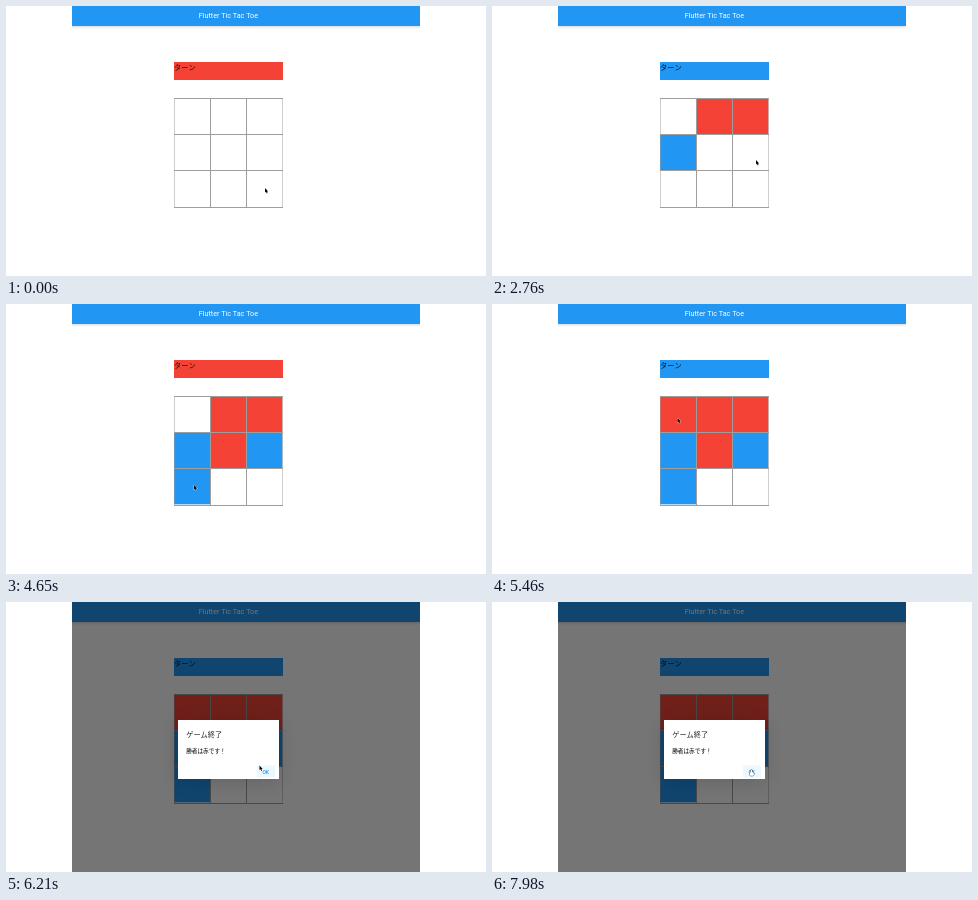
An HTML page with a canvas that plays this animation: 480x270 px, repeating every 8000 ms.

```html
<!DOCTYPE html>
<html lang="ja">
<head>
<meta charset="utf-8">
<title>Flutter Tic Tac Toe</title>
<style>
  html, body { margin: 0; width: 100%; height: 100%; overflow: hidden; background: #fff; }
  canvas { display: block; }
</style>
</head>
<body>
<canvas id="stage" width="480" height="270"></canvas>
<script>
const ctx = document.getElementById('stage').getContext('2d');
const LOOP = 8000;
const RED = '#f44336', BLUE = '#2196f3', INK = 'rgba(0,0,0,.87)';
const FONT = 'Roboto, "Noto Sans CJK JP", "Noto Sans CJK", sans-serif';
const BOARD = { x: 168, y: 92.3, size: 109, cell: 109 / 3 };
const MS_PER_PIXEL = 6;

// Where the pointer comes to rest, and when it arrives there
const stops = [
  { at: 0, x: 259, y: 182 },
  { at: 930, x: 223, y: 111 },
  { at: 1500, x: 182, y: 143.5 },
  { at: 2280, x: 258, y: 112 },
  { at: 2760, x: 264, y: 154 },
  { at: 3130, x: 225, y: 155 },
  { at: 3840, x: 190, y: 121 },
  { at: 4440, x: 188, y: 181 },
  { at: 5220, x: 185.5, y: 114 },
  { at: 6210, x: 253.5, y: 163.5 },
  { at: 6620, x: 357, y: 171 },
  { at: 7020, x: 291, y: 166 },
  { at: 7740, x: 259.5, y: 168 },
];
const clicks = [1080, 1710, 2370, 2940, 3480, 4590, 5460];
const dialogStart = clicks.at(-1) + 30;

const clamp = v => Math.max(0, Math.min(1, v));
const smooth = v => v * v * (3 - 2 * v);

function pointerAt(t) {
  const next = stops.findIndex(stop => stop.at > t);
  if (next < 0) return stops.at(-1);
  const from = stops[next - 1], to = stops[next];
  const travel = MS_PER_PIXEL * Math.hypot(to.x - from.x, to.y - from.y);
  const depart = Math.max(from.at, to.at - travel);
  const k = smooth(clamp((t - depart) / (to.at - depart)));
  return { x: from.x + (to.x - from.x) * k, y: from.y + (to.y - from.y) * k };
}

// Each click claims the cell under the pointer; red starts
const gridLine = (origin, i) => Math.floor(origin + i * BOARD.cell);
const moves = clicks.map((time, i) => {
  const { x, y } = pointerAt(time);
  return {
    time,
    col: Math.floor((x - BOARD.x) / BOARD.cell),
    row: Math.floor((y - BOARD.y) / BOARD.cell),
    color: i % 2 ? BLUE : RED,
  };
});

function rect(x, y, w, h, color) {
  ctx.fillStyle = color;
  ctx.fillRect(x, y, w, h);
}

function text(str, x, y, size, color, weight = 400) {
  ctx.font = `${weight} ${size}px ${FONT}`;
  ctx.fillStyle = color;
  ctx.fillText(str, x, y);
}

function drawBoard(t) {
  const played = moves.filter(move => move.time <= t);

  rect(66, 0, 348, 20, BLUE);
  const shade = ctx.createLinearGradient(0, 20, 0, 23);
  shade.addColorStop(0, 'rgba(0,0,0,.12)');
  shade.addColorStop(1, 'rgba(0,0,0,0)');
  rect(66, 20, 348, 3, shade);
  text('Flutter Tic Tac Toe', 192.8, 12.2, 7.2, '#fff');

  rect(168, 56, BOARD.size, 18, played.length % 2 ? BLUE : RED);
  text('ターン', 168, 64.4, 7.2, INK);

  for (const { col, row, color } of played) {
    const x = gridLine(BOARD.x, col), y = gridLine(BOARD.y, row);
    rect(x, y, BOARD.cell, BOARD.cell, color);
  }
  for (let i = 0; i <= 3; i++) {
    const outer = i % 3 === 0;
    const x = Math.min(gridLine(BOARD.x, i), BOARD.x + BOARD.size - 1);
    rect(x, 92, 1, 110, outer ? 'rgba(158,158,158,.5)' : '#9e9e9e');
    rect(BOARD.x, gridLine(BOARD.y, i), BOARD.size, 1, '#9e9e9e');
  }
}

function drawDialog(t, hovered) {
  const open = clamp((t - dialogStart) / 150);
  if (!open) return;
  rect(66, 0, 348, 270, `rgba(0,0,0,${0.54 * smooth(open)})`);

  ctx.save();
  ctx.globalAlpha = 1 - (1 - open) ** 2;
  ctx.shadowColor = 'rgba(0,0,0,.14)';
  ctx.shadowBlur = 18;
  ctx.shadowOffsetY = 3;
  rect(172, 118, 101, 59, '#fff');
  ctx.shadowColor = 'transparent';

  text('ゲーム終了', 180.2, 134.8, 7.2, INK);
  text('勝者は赤です！', 180.2, 151.2, 5.65, '#000', 500);
  if (hovered) rect(251, 163.5, 18, 12, 'rgba(33,150,243,.08)');
  text('OK', 256.4, 171.5, 4.95, BLUE, 500);
  ctx.restore();
}

function drawArrow(x, y) {
  const arrow = new Path2D(`M${x} ${y}v4.6l1-.9 .8 1.7 .8-.4 -.8-1.6h1.4z`);
  ctx.lineWidth = 0.6;
  ctx.strokeStyle = '#fff';
  ctx.stroke(arrow);
  ctx.fillStyle = '#000';
  ctx.fill(arrow);
}

function drawHand(x, y) {
  ctx.beginPath();
  ctx.roundRect(x - 0.6, y - 0.5, 1.2, 3.5, 0.6);
  ctx.roundRect(x - 2, y + 2, 4.4, 3.8, 1.5);
  ctx.lineWidth = 0.8;
  ctx.strokeStyle = '#222';
  ctx.stroke();
  ctx.fillStyle = '#fff';
  ctx.fill();
}

function draw(now) {
  const t = now % LOOP;
  const { x, y } = pointerAt(t);
  const hovered = t > dialogStart && x > 251 && x < 269 && y > 163;

  rect(0, 0, 480, 270, '#fff');
  drawBoard(t);
  drawDialog(t, hovered);
  if (hovered && x > 256) drawHand(x, y);
  else drawArrow(x, y);
  requestAnimationFrame(draw);
}
requestAnimationFrame(draw);
</script>
</body>
</html>
```
